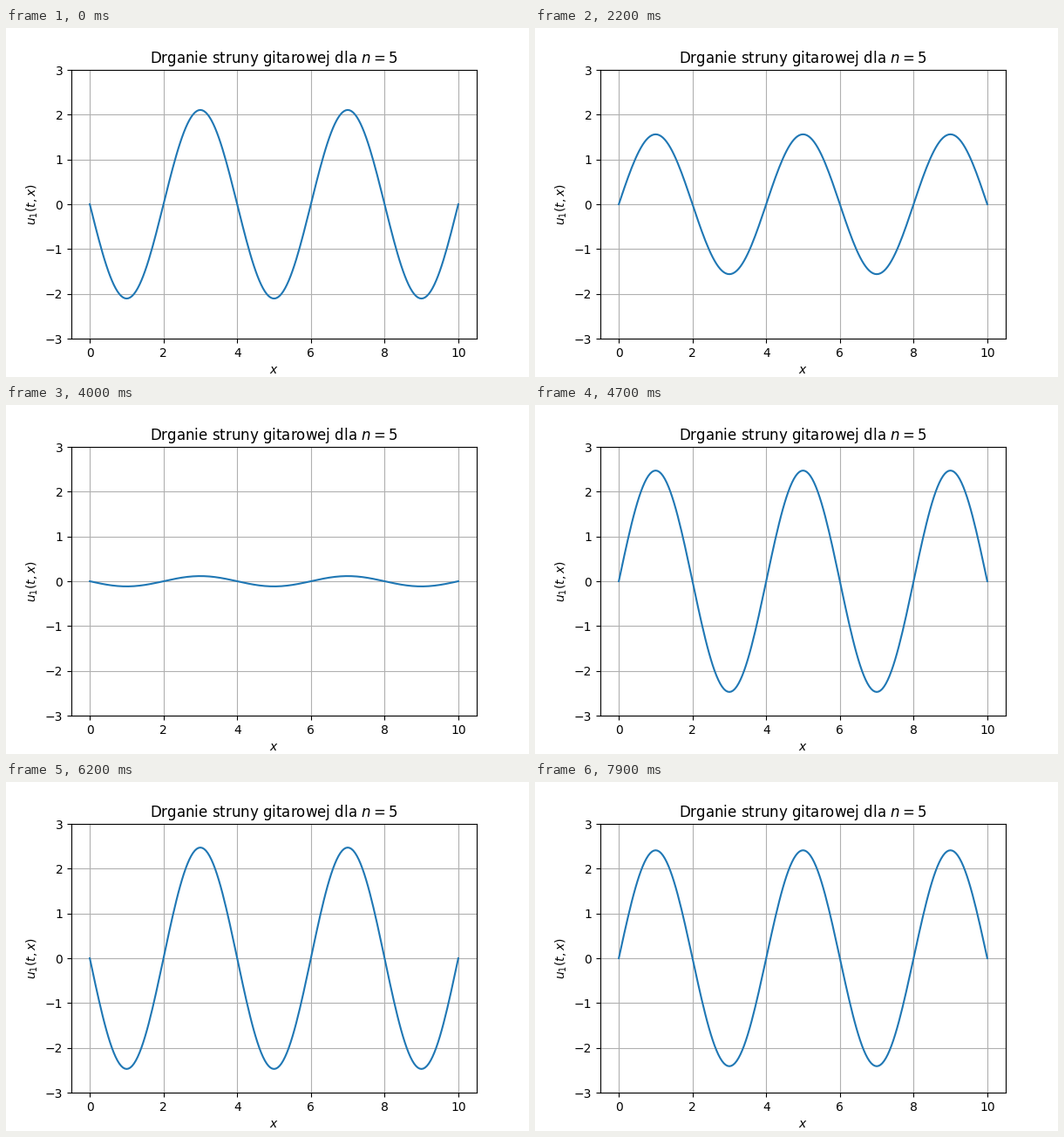
Animation of 600 by 400 pixels, one loop 8000 ms. Source, as a matplotlib script:

```python
import numpy as np
import matplotlib.pyplot as plt
from matplotlib.animation import FuncAnimation

FRAMES = 80
INTERVAL = 100      # ms
PERIOD = 30         # frames per oscillation
AMPLITUDE = 2.5
PHASE = 2.72        # frames until the first extreme
LENGTH = 10
N = 5

x = np.linspace(0, LENGTH, 201)
mode = np.sin(N * np.pi * x / LENGTH)


def displacement(frame):
    angle = 2 * np.pi * (frame - PHASE) / PERIOD
    return -AMPLITUDE * np.cos(angle) * mode


fig, ax = plt.subplots(figsize=(6, 4), dpi=100)
line, = ax.plot(x, displacement(0))
ax.set_ylim(-3, 3)
ax.set_title(f"Drganie struny gitarowej dla $n={N}$")
ax.set_xlabel("$x$")
ax.set_ylabel("$u_1(t,x)$")
ax.grid()


def update(frame):
    line.set_ydata(displacement(frame))
    return line,


anim = FuncAnimation(fig, update, frames=FRAMES, interval=INTERVAL,
                     repeat=True, repeat_delay=0)
plt.show()
```
